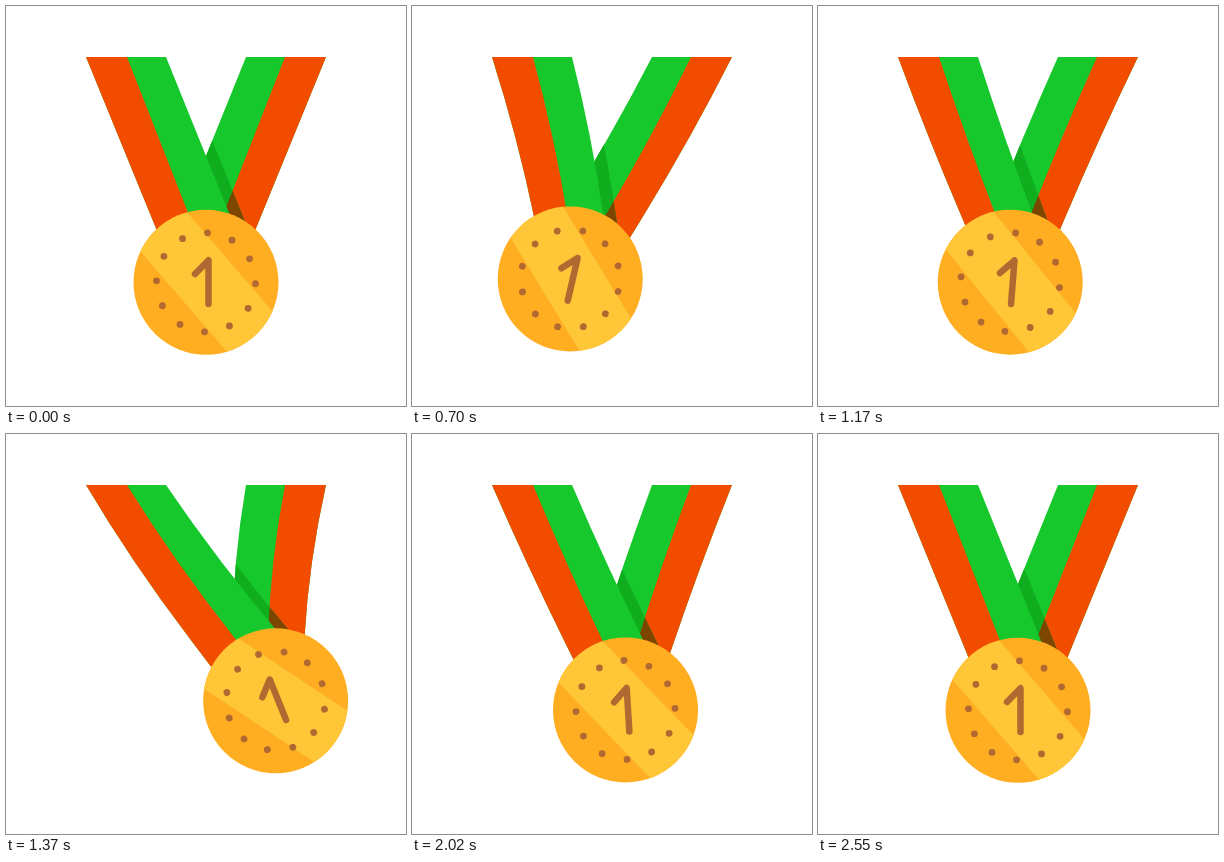
Recreate the animation shown at these times as an HTML page with a canvas. Size 400 px wide and 400 px high, loop 2.6 s.

```html
<!DOCTYPE html>
<html lang="en">
<head>
<meta charset="utf-8">
<title>Swinging medal</title>
<style>
  html, body { margin: 0; width: 100%; height: 100%; overflow: hidden; background: #fff; }
  canvas { display: block; }
</style>
</head>
<body>
<canvas width="400" height="400"></canvas>
<script>
const ctx = document.querySelector('canvas').getContext('2d');
const LOOP = 2600, STEP = 25, ARM = 250, RADIUS = 72.5;
const ORANGE = '#f24c00', GREEN = '#17c82c';
const DARK_ORANGE = '#7d4600', DARK_GREEN = '#10ad1e';

// Extremes of the swing: [time in ms, sideways offset]
const SWING = [[975, -68], [1415, 72.5], [1776, -40], [2120, 25], [2550, 0]];

// Ribbon edges from outside to inside, relative to the centre line
const EDGES = [
  { top: -120, bottom: -53.3 },
  { top: -79, bottom: -15 },
  { top: -40, bottom: 26 }
];
// How far each edge lags behind the medal sideways
const FRONT = { side: 1, sway: [0.42, 0.32, 0.22], bend: 0.002 };
const BACK = { side: -1, sway: [0.43, 0.41, 0.33], bend: 0.003 };

function swing(t) {
  if (t <= 500 || t >= 2550) return 0;
  const [firstTime, firstX] = SWING[0];
  if (t < firstTime) return firstX * Math.sin(Math.PI / 2 * (t - 500) / (firstTime - 500));
  const i = SWING.findIndex(key => t < key[0]);
  const [t0, x0] = SWING[i - 1], [t1, x1] = SWING[i];
  return x0 + (x1 - x0) * (1 - Math.cos(Math.PI * (t - t0) / (t1 - t0))) / 2;
}

const angleOf = dx => -Math.atan(dx / ARM);

// Start, control, end and tail points of one ribbon edge
function edgeCurve(ribbon, index, pose) {
  const { dx, cy, bulge, squeeze } = pose;
  const { side, sway, bend } = ribbon;
  const edge = EDGES[index];
  const start = { x: 200 + side * edge.top, y: 51 };
  const shift = sway[index] * (side * dx + bend * dx * dx) + squeeze * (index - 1);
  const end = { x: 200 + dx + side * (edge.bottom - shift), y: cy - 62 };
  const mid = { x: (start.x + end.x) / 2 + 2 * bulge, y: (start.y + end.y) / 2 };
  const tail = { x: end.x + (end.x - mid.x) * 0.45, y: end.y + (end.y - mid.y) * 0.45 };
  return { start, mid, end, tail };
}

function stripPath(ribbon, from, to, pose, offset = 0) {
  const a = edgeCurve(ribbon, from, pose);
  const b = edgeCurve(ribbon, to, pose);
  const path = new Path2D();
  path.moveTo(a.start.x + offset, a.start.y);
  path.quadraticCurveTo(a.mid.x + offset, a.mid.y, a.end.x + offset, a.end.y);
  path.lineTo(a.tail.x + offset, a.tail.y);
  path.lineTo(b.tail.x + offset, b.tail.y);
  path.lineTo(b.end.x + offset, b.end.y);
  path.quadraticCurveTo(b.mid.x + offset, b.mid.y, b.start.x + offset, b.start.y);
  path.closePath();
  return path;
}

function drawRibbon(ribbon, pose, outer, inner) {
  ctx.fillStyle = inner;
  ctx.fill(stripPath(ribbon, 0, 2, pose));
  ctx.fillStyle = outer;
  ctx.fill(stripPath(ribbon, 0, 1, pose));
}

function disc(x, y, r, color) {
  ctx.fillStyle = color;
  ctx.beginPath();
  ctx.arc(x, y, r, 0, 2 * Math.PI);
  ctx.fill();
}

function drawMedal(pose) {
  ctx.save();
  ctx.translate(200 + pose.dx, pose.cy);
  disc(0, 0, RADIUS, '#ffad21');

  ctx.save();
  ctx.clip();
  ctx.rotate(pose.tilt + 49.2 * Math.PI / 180);
  ctx.fillStyle = '#ffc637';
  ctx.fillRect(-80, -31.4, 160, 60.9);
  ctx.restore();

  ctx.rotate(pose.faceTilt);
  for (let i = 0; i < 12; i++) {
    const a = (i * 30 + 1.7) * Math.PI / 180;
    disc(49.5 * Math.sin(a), -49.5 * Math.cos(a), 3.4, '#b16931');
  }
  ctx.strokeStyle = '#b16931';
  ctx.lineWidth = 6.5;
  ctx.lineCap = ctx.lineJoin = 'round';
  ctx.beginPath();
  ctx.moveTo(-11, -8.3);
  ctx.lineTo(2.5, -22);
  ctx.lineTo(2.5, 21.7);
  ctx.stroke();
  ctx.restore();
}

function draw(t) {
  const dx = swing(t);
  const speed = dx ? (swing(t + 1) - swing(t - 1)) / 2 : 0;
  const pose = {
    dx,
    cy: 276.3 - dx * dx * 0.00195,
    bulge: -0.04 * dx - 3 * speed,
    squeeze: 6 * Math.abs(speed), // fast ribbons narrow towards the medal
    tilt: angleOf(dx),
    faceTilt: 1.45 * angleOf(swing(t - 12)) // the face trails the disc a little
  };

  ctx.clearRect(0, 0, 400, 400);
  drawRibbon(BACK, pose, ORANGE, GREEN);
  ctx.save();
  ctx.clip(stripPath(FRONT, 0, 2, pose, 12.5));
  drawRibbon(BACK, pose, DARK_ORANGE, DARK_GREEN);
  ctx.restore();
  drawRibbon(FRONT, pose, ORANGE, GREEN);
  drawMedal(pose);
}

function tick() {
  const t = performance.now() % LOOP;
  draw(Math.floor((t + 5) / STEP) * STEP);
  requestAnimationFrame(tick);
}
tick();
</script>
</body>
</html>
```
